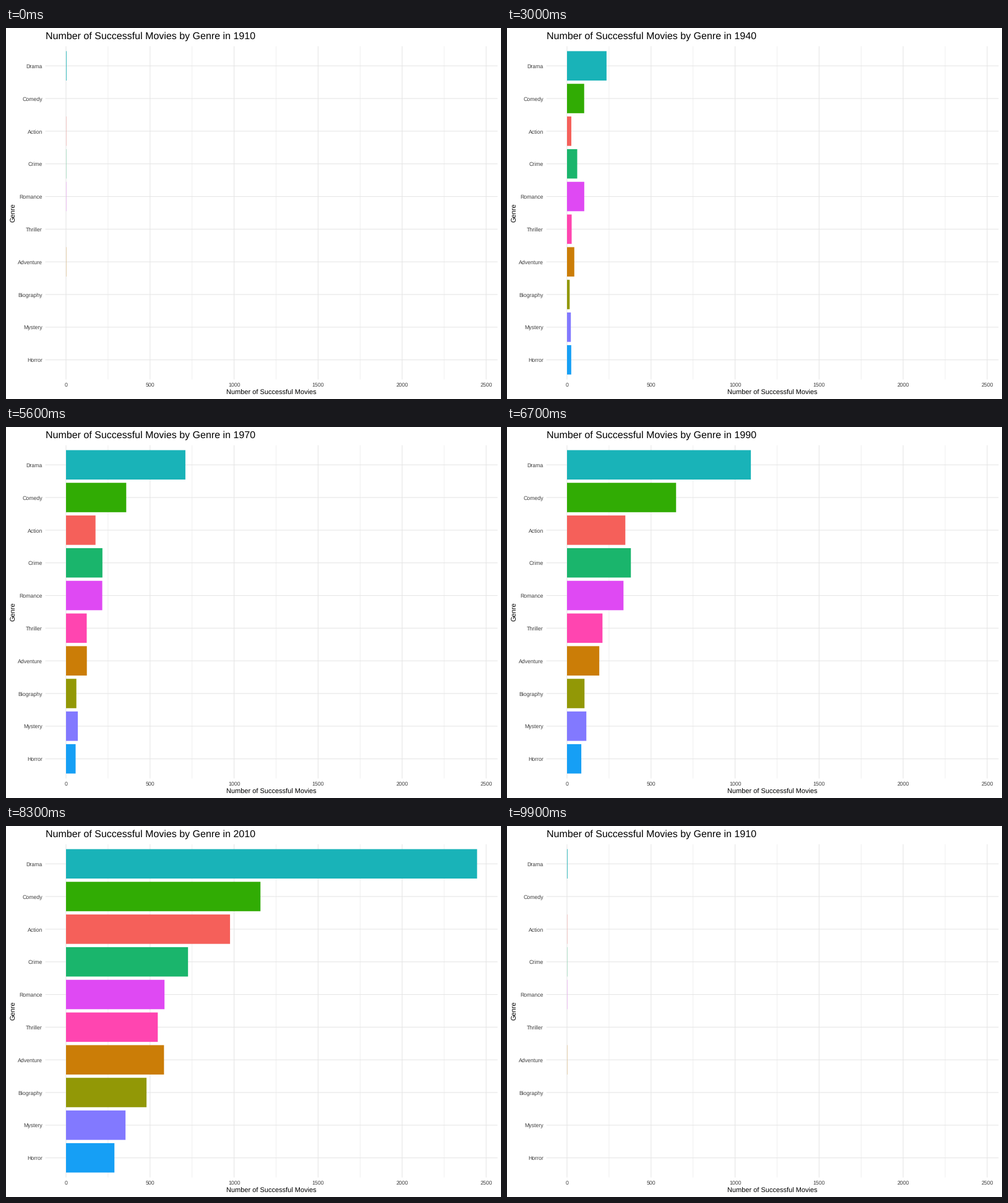
Animation, 800 px wide and 600 px high, one loop 10000 ms. Source, as a matplotlib script:

```python
import numpy as np
import matplotlib.pyplot as plt
from matplotlib.animation import FuncAnimation
from matplotlib.patches import Rectangle

plt.rcParams["font.family"] = "Liberation Sans"
plt.rcParams["text.hinting"] = "none"
plt.rcParams["toolbar"] = "None"

W, H, DPI = 800, 600, 100
X0, SCALE = 97.0, 0.2716          # pixel of zero, pixels per movie
Y0, PITCH = 61.2, 52.83           # first row centre, row spacing
LEFT, RIGHT, TOP, BOTTOM = 63.6, 794.4, 29.5, 568.4
BAR = 0.9 * PITCH
GRID, MINOR, TICK = "#e6e6e6", "#e9e9e9", "#404040"

HOLD = 3                          # still frames before each move
STEPS = [6] * 5 + [4] + [5] * 6   # frames per move
DECADES = np.arange(1910, 2021, 10)

# counts at the key years; the decades between follow straight lines
KEY_YEARS = [1910, 1930, 1960, 1990, 2010, 2020]
GENRES = {
    "Drama": ("#19b3b8", [3, 133, 434, 1094, 2446, 977]),
    "Comedy": ("#31ac04", [0, 78, 149, 649, 1157, 457]),
    "Action": ("#f5605a", [1, 12, 52, 347, 976, 421]),
    "Crime": ("#1ab56c", [1, 41, 99, 380, 726, 289]),
    "Romance": ("#df49f3", [1, 89, 129, 336, 586, 194]),
    "Thriller": ("#ff45b0", [0, 11, 60, 211, 546, 298]),
    "Adventure": ("#cb7d07", [1, 27, 75, 192, 583, 229]),
    "Biography": ("#929806", [0, 8, 31, 104, 479, 175]),
    "Mystery": ("#8279ff", [0, 15, 38, 115, 354, 157]),
    "Horror": ("#169ff5", [0, 19, 37, 85, 288, 151]),
}
COUNTS = np.array([np.interp(DECADES, KEY_YEARS, keys)
                   for _, keys in GENRES.values()])

fig = plt.figure(figsize=(W / DPI, H / DPI), dpi=DPI, facecolor="white")
ax = fig.add_axes([0, 0, 1, 1])
ax.set_xlim(0, W)
ax.set_ylim(H, 0)
ax.axis("off")


def px(size):
    return size * 72 / DPI


def grid(xs, ys, width=1.07, color=GRID):
    ax.plot(xs, ys, color=color, lw=px(width), snap=False,
            solid_capstyle="butt", zorder=1)


def label(x, y, text, size, color="black", **kw):
    return ax.text(x, y, text, fontsize=px(size), color=color,
                   va="baseline", zorder=3, **kw)


for value in range(250, 2500, 500):
    x = X0 + value * SCALE
    grid([x, x], [TOP, BOTTOM], 0.7, MINOR)

for value in range(0, 2501, 500):
    x = X0 + value * SCALE
    grid([x, x], [TOP, BOTTOM])
    label(x, 580, str(value), 8.8, TICK, ha="center")

bars = []
for i, (name, (color, _)) in enumerate(GENRES.items()):
    y = Y0 + PITCH * i
    grid([LEFT, RIGHT], [y, y])
    label(59, y + 3.7, name, 8.8, TICK, ha="right")
    bars.append(ax.add_patch(Rectangle((X0, y - BAR / 2), 0, BAR, lw=0,
                                       color=color, snap=False, zorder=2)))

label(429, 593, "Number of Successful Movies", 11, ha="center")
label(14, 299, "Genre", 11, ha="center", rotation=90, rotation_mode="anchor")
title = label(63.6, 18, "", 16, ha="left")


def ease(t):
    """Cubic in and out."""
    return 4 * t ** 3 if t < 0.5 else 1 - 4 * (1 - t) ** 3


def locate(frame):
    """Return the decade index and the linear progress to the next one."""
    for k, steps in enumerate(STEPS):
        if frame < HOLD + steps:
            return k, max(0, frame - HOLD + 1) / steps
        frame -= HOLD + steps


def draw(frame):
    k, t = locate(frame)
    nxt = (k + 1) % len(DECADES)
    year = DECADES[nxt if t > 0.5 else k]
    title.set_text(f"Number of Successful Movies by Genre in {year}")
    values = COUNTS[:, k] + (COUNTS[:, nxt] - COUNTS[:, k]) * ease(t)
    for bar, value in zip(bars, values):
        bar.set_width(value * SCALE)
    return [title, *bars]


anim = FuncAnimation(fig, draw, frames=sum(STEPS) + HOLD * len(STEPS),
                     init_func=lambda: draw(0), interval=100,
                     repeat=True, repeat_delay=0, blit=False)
plt.show()
```
